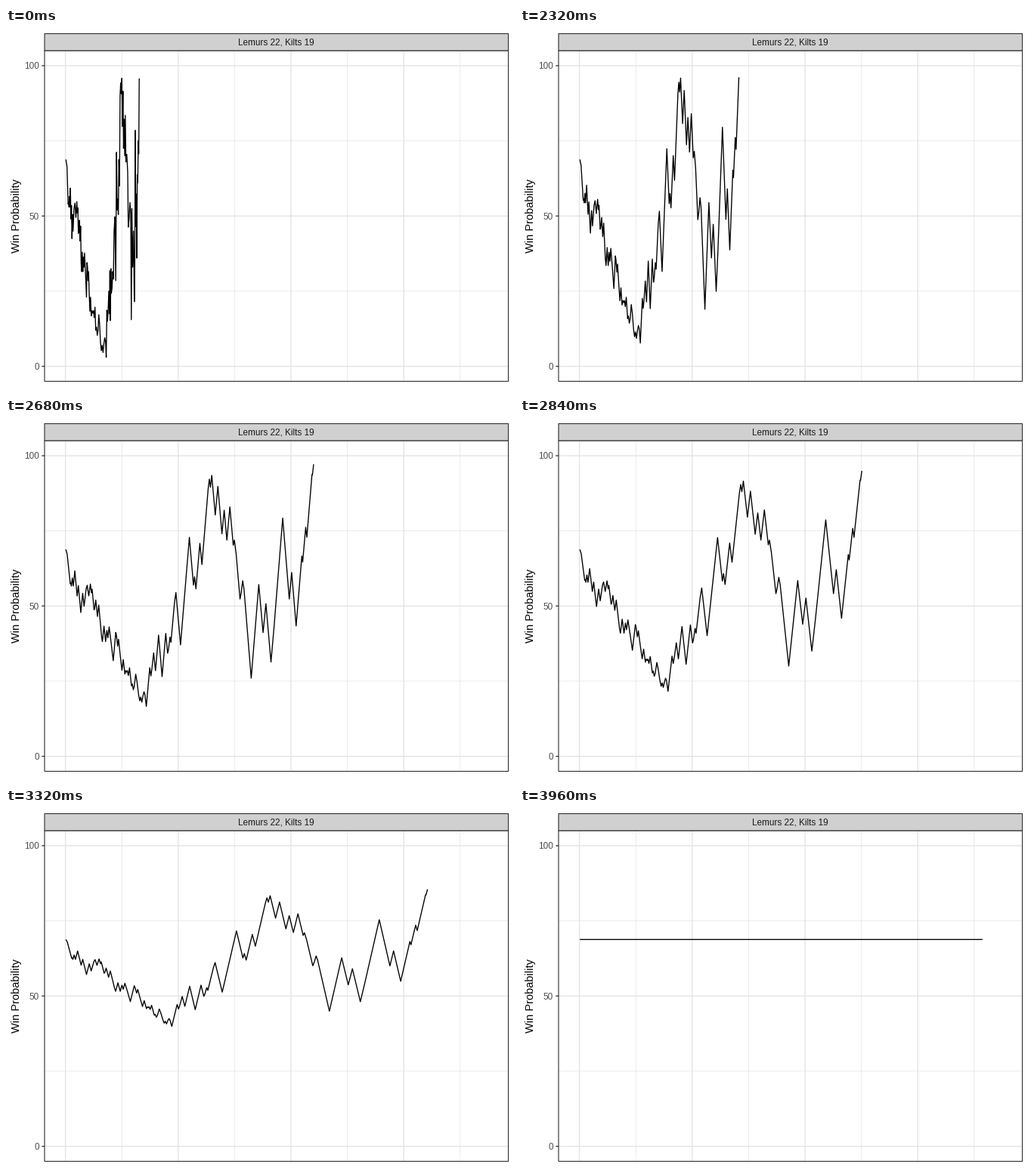
These frames come from a looping animation (672 px wide and 480 px high, 6 s). A matplotlib script:

```python
import matplotlib.pyplot as plt
import numpy as np
from matplotlib.animation import FuncAnimation
from matplotlib.patches import Rectangle

plt.rcParams["font.family"] = "Liberation Sans"
plt.rcParams["path.simplify"] = False

W, H, DPI = 672, 480, 100
PT = 72 / DPI  # points per pixel
FRAMES, INTERVAL = 150, 40
HOLD, STEPS = 50, 49

LEFT, RIGHT, TOP, BOTTOM = 51, 664.5, 30, 468.5
STRIP_TOP = 7.5
X0, X1 = 79.2, 611.8
Y_ZERO, Y_UNIT = 448.6, 3.986
GRID, DARK = "#e3e3e3", "#333333"

# Win probability by drive: last play, then evenly spaced values up to it.
START = 68.8
DRIVES = [
    (3, [66.5]),
    (6, [60, 54]),
    (12, [54.5, 53, 56.5, 53, 59.3]),
    (19, [49, 53.5, 42.5, 50.5, 45]),
    (29, [52.5, 54.3, 49.5, 54.8]),
    (33, [51, 52.7, 44.2]),
    (39, [45, 48.6, 41.7, 46.6]),
    (49.3, [34, 31.5, 38, 31.5, 36.3, 33, 37.7]),
    (54.5, [31, 23]),
    (60, [34.5, 33, 28.5, 31.5]),
    (67, [24, 18.3, 23, 16.8]),
    (87, [18.5, 17.7, 18.5, 16.2, 19.7, 12, 13, 10.3, 11.8, 17.2]),
    (105, [14, 8, 5.2, 7, 4.6, 7.5, 9.5, 8.2]),
    (115.2, [3, 18.7, 15, 18.5, 25, 17.5]),
    (120.2, [31.8, 15.2, 32.5, 24.3]),
    (127.5, [26, 31.5, 29, 45]),
    (134, [49.7, 28.5, 71.2]),
    (141.8, [52, 55.7, 50.5, 68.8, 60]),
    (148, [90, 94.3, 90.7, 95.8]),
    (158.7, [79.8, 91.5, 72.5, 82.2, 70, 83.5, 68]),
    (163.5, [70.5, 64.5]),
    (165, [46.3]),
    (171.6, [49, 54.5, 50.8]),
    (174.5, [15.5, 52.5]),
    (181, [33, 45, 21.5]),
    (192.7, [35, 78.5, 46.5, 57.3, 36, 63.7, 61, 75, 70.7]),
    (196.5, [95.6, 95.6, 100]),
]
OFF_SCALE_STEPS = 10  # the final value lies above the scale until then


def load_segments():
    plays, probs = [0], [START]
    for end, values in DRIVES:
        plays.extend(np.linspace(plays[-1], end, len(values) + 1)[1:])
        probs.extend(values)
    dx, dy = np.diff(plays), np.diff(probs)
    return np.hypot(dx, dy), np.arctan2(dy, dx)


LENGTHS, ANGLES = load_segments()
X_UNIT = (X1 - X0) / LENGTHS.sum()


def y_px(value):
    return Y_ZERO - Y_UNIT * np.asarray(value)


def unfolded(step):
    """Chain of rigid segments, each turned part of the way to level."""
    angles = ANGLES * (1 - step / STEPS)
    x = np.append(0, np.cumsum(LENGTHS * np.cos(angles)))
    y = START + np.append(0, np.cumsum(LENGTHS * np.sin(angles)))
    if step < OFF_SCALE_STEPS:
        x, y = x[:-1], y[:-1]
    return X0 + X_UNIT * x, y_px(y)


fig = plt.figure(figsize=(W / DPI, H / DPI), dpi=DPI, facecolor="white")
ax = fig.add_axes([0, 0, 1, 1])
ax.set_xlim(0, W)
ax.set_ylim(H, 0)
ax.axis("off")


def stroke(xs, ys, color, width, z):
    return ax.plot(xs, ys, color=color, lw=width * PT, zorder=z, snap=False,
                   solid_capstyle="butt", solid_joinstyle="round")[0]


def box(top, bottom, fill, z):
    ax.add_patch(Rectangle((LEFT, top), RIGHT - LEFT, bottom - top, fc=fill,
                           ec=DARK, lw=1.15 * PT, zorder=z, snap=False))


def label(x, y, text, size, color, ha="center", rotation=0):
    ax.text(x, y, text, fontsize=size * PT, color=color, ha=ha, va="baseline",
            rotation=rotation, rotation_mode="anchor", zorder=6)


for i in range(8):
    x = 78.6 + 74.6 * i
    stroke([x, x], [TOP, BOTTOM], GRID, 0.7 if i % 2 else 1.3, 1 + (i + 1) % 2)
for value in (0, 25, 50, 75, 100):
    y = float(y_px(value))
    minor = value % 50
    stroke([LEFT, RIGHT], [y, y], GRID, 0.7 if minor else 1.3, 1 if minor else 2)
    if not minor:
        stroke([LEFT - 3.7, LEFT], [y, y], DARK, 1.3, 2)
        label(44, y + 4.3, str(value), 11.7, "#4d4d4d", ha="right")

box(TOP, BOTTOM, "none", 4)
box(STRIP_TOP, TOP, "#d0d0d0", 4)
label((LEFT + RIGHT) / 2, 23, "Lemurs 22, Kilts 19", 11.7, "#1a1a1a")
label(18, (TOP + BOTTOM) / 2, "Win Probability", 14.6, "black", rotation=90)

line = stroke([], [], "black", 1.35, 3)


def update(frame):
    line.set_data(*unfolded(min(max(frame - HOLD, 0), STEPS)))
    return [line]


anim = FuncAnimation(fig, update, frames=FRAMES, interval=INTERVAL,
                     init_func=lambda: update(0), repeat=True, repeat_delay=0)
plt.show()
```
